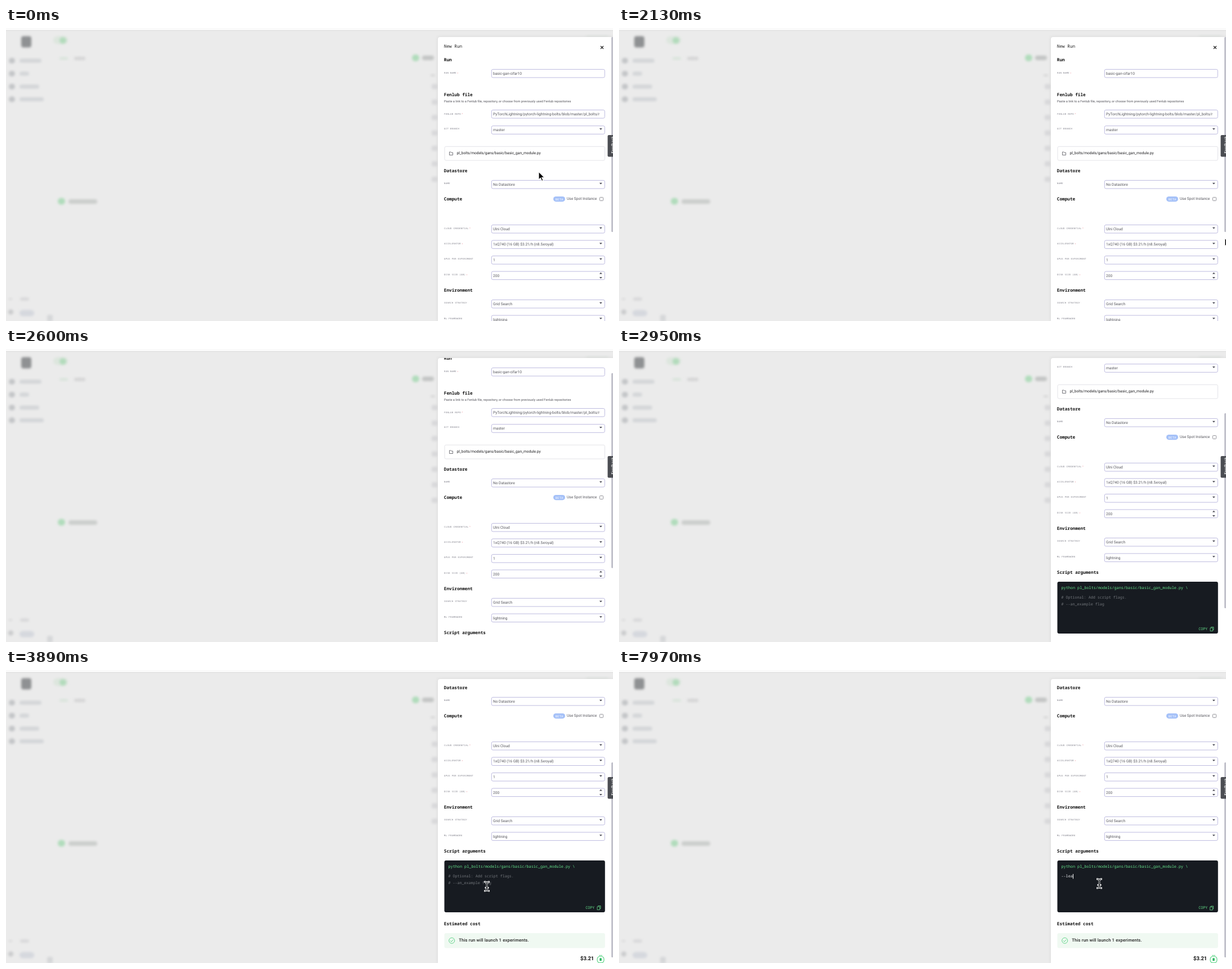
Write an HTML page that moves like this. It is 1078 px wide and 520 px high and loops after 8000 ms.

```html
<!DOCTYPE html>
<html lang="en">
<head>
<meta charset="utf-8">
<title>New Run</title>
<style>
html, body { margin: 0; width: 100%; height: 100%; overflow: hidden; background: #ebebeb; }
svg { display: block; }
text { font-family: Roboto, sans-serif; font-size: 6.62px; fill: #55555c; text-rendering: geometricPrecision; white-space: pre; }
.mono { font-family: "Noto Sans Mono", "DejaVu Sans Mono", monospace; }
.head { font-size: 7.72px; font-weight: 700; fill: #111; }
.title { font-size: 7.72px; fill: #222; }
.label { font-size: 3.9px; letter-spacing: .4px; fill: #70707c; }
.star { fill: #e5808a; }
.desc { font-size: 5.66px; }
.code { font-size: 6.82px; fill: #66e38c; }
.hint { font-size: 6.7px; fill: #73777c; }
.typed { font-size: 6.75px; fill: #eceef0; }
</style>
</head>
<body>
<svg id="stage" width="1078" height="520" viewBox="0 0 1078 520">
  <defs>
    <filter id="soft" x="-50%" y="-50%" width="200%" height="200%"><feGaussianBlur stdDeviation="2.3"/></filter>
    <filter id="shade" x="-10%" y="-10%" width="120%" height="120%"><feGaussianBlur stdDeviation="2"/></filter>
    <clipPath id="clip"><path d="M767 520V20q0-4 4-4H1078V520z"/></clipPath>
  </defs>
  <rect width="1078" height="520" fill="#ebebeb"/>
  <rect width="1078" height="4" fill="#fafafa"/>
  <rect y="4" width="1078" height="1" fill="#d9dada"/>
  <g id="back"></g>
  <path d="M766 522V20q0-5 5-5H1080V522z" fill="#cfcfcf" opacity=".5" filter="url(#shade)"/>
  <g clip-path="url(#clip)">
    <rect x="767" y="16" width="311" height="504" fill="#fff"/>
    <g id="form"></g>
  </g>
  <rect id="thumb" x="1075" y="16" width="3.5" height="346" rx="1.5" fill="#c2c2cc"/>
  <g>
    <path d="M1078 190h-7.500q-2 0-2 2v34.500q0 2 2 2h7.500z" fill="#4b4d52"/>
    <text transform="translate(1079.800 222.500) rotate(-90)" style="font-size:7px;font-weight:500;fill:#fff">Feedback</text>
  </g>
  <path id="arrow" d="M0 0V14.200L3.300 11.200L5.600 16.500L8 15.500L5.700 10.300H10.200Z" fill="#000" stroke="#fff" stroke-width="1.100"/>
  <g id="beam" fill="none">
    <path id="beamEdge" stroke="#fff" stroke-width="2.800" stroke-linecap="square"/>
    <path id="beamCore" stroke="#15181c" stroke-width="1"/>
  </g>
</svg>
<script>
const $ = id => document.getElementById(id);

function add(parent, tag, attrs, words) {
  const el = document.createElementNS("http://www.w3.org/2000/svg", tag);
  for (const k in attrs) el.setAttribute(k, attrs[k]);
  if (words) el.textContent = words;
  parent.appendChild(el);
  return el;
}

// Blurred page behind the panel
const back = $("back");
const blur = (x, y, w, h, fill, r = h / 2) =>
  add(back, "rect", { x, y: y - h / 2, width: w, height: h, rx: r, fill, filter: "url(#soft)" });

blur(27, 24.5, 18, 20, "#8f9193", 4);
blur(84, 21.5, 26, 14, "#dde6de");
blur(95, 22, 12, 11, "#b2dbbc");
[[58, 39], [81, 17], [104, 35], [126.5, 43]].forEach(([y, w]) => {
  blur(5, y, 11, 10, "#c3c5c7");
  blur(24, y, w, 7, "#d3d5d8");
});
blur(95, 54, 15, 5, "#d9e4db");
blur(121, 54, 20, 6, "#d5d5d6");
blur(721, 53, 13, 12, "#b0dcbb");
blur(739, 53, 21, 8, "#c3c5c4");
blur(754, 84, 8, 4, "#d6d6d6");
for (let i = 0; i < 7; i++) blur(756, 104 + i * 27.4, 11, 9, "#d8d8da", 2);
blur(92, 307.5, 13, 12, "#b0dcbb");
blur(111, 308, 51, 8, "#cbcecc");
blur(5, 481, 6, 4, "#dadadb");
blur(25, 481, 16, 6, "#d9d9da");
blur(4, 504, 9, 9, "#c9cacc");
blur(24, 506, 26, 11, "#d5d8de");
blur(73, 515, 10, 12, "#d6d7d9", 3);
blur(1030, 15, 40, 4, "#dfe3e0");

// Panel form
const form = $("form");
const text = (x, y, words, cls = "", parent = form) => add(parent, "text", { x, y, class: cls }, words);
const box = (x, y, width, height, rx, fill, stroke = "none") =>
  add(form, "rect", { x, y, width, height, rx, fill, stroke });
const line = (d, stroke, w = 1, fill = "none", parent = form) =>
  add(parent, "path", { d, stroke, "stroke-width": w, fill, "stroke-linejoin": "round" });
const head = (y, words) => text(777.8, y + 2.7, words, "mono head");
const tri = (y, h) => add(form, "path", { d: `M1053.800 ${y}h5l-2.500 ${h}z`, fill: "#4a4a55" });

function field(cy, labelY, label, value, kind, must) {
  text(778, labelY + 1.5, label, "mono label");
  if (must) text(778 + label.length * 2.74 + 1, labelY + 2, "*", "mono label star");
  box(862.3, cy - 7.3, 201, 14.6, 2.5, "#fff", "#bdbbdf");
  text(865, cy + 2.2, value);
  if (kind === "select") tri(cy - 3, 2.8);
  if (kind === "number") { tri(cy - 2.7, -2.8); tri(cy + 2.7, 2.8); }
}

text(777.8, 35.2, "New Run", "mono title");
line("M1056 32l5 5m0-5l-5 5", "#222", 1.2);

head(56, "Run");
field(80.7, 79.5, "RUN NAME", "basic-gan-cifar10", "", true);

head(118, "Fenlub file");
text(778, 132, "Paste a link to a Fenlub file, repository, or choose from previously used Fenlub repositories", "desc");
field(152.8, 152, "FENLUB REPO", "PyTorchLightning/pytorch-lightning-bolts/blob/master/pl_bolts/r", "", true);
field(181, 178, "GIT BRANCH", "master", "select");
box(779, 210.3, 284.500, 24.700, 2.5, "#fff", "#e3e3e8");
line("M787.500 220h2.300l1 1.100h2.700v4.400h-6z", "#55555c", .8);
text(800.5, 224.2, "pl_bolts/models/gans/basic/basic_gan_module.py").style.fill = "#1c1c1f";

head(253, "Datastore");
field(277.7, 275, "NAME", "No Datastore", "select");

head(303, "Compute");
box(972, 299, 21, 9.2, 4.6, "#a5c1f8");
text(975.7, 305.5, "BETA").style.cssText = "font-size:5.2px;letter-spacing:.4px;fill:#fff";
text(996, 305.2, "Use Spot Instance");
box(1054.5, 300.5, 6, 6, .8, "#fff", "#96969c");
field(356.7, 355, "CLOUD CREDENTIAL", "Ulni Cloud", "select", true);
field(384.2, 382.5, "ACCELERATOR", "1xQ740 (16 GB) $3.21/h (n8.5xroyal)", "select", true);
field(411.8, 409.5, "GPUS PER EXPERIMENT", "1", "select");
field(439.3, 437.5, "DISK SIZE (GB)", "200", "number", true);

head(465, "Environment");
field(489.7, 487.5, "SEARCH STRATEGY", "Grid Search", "select");
field(517.3, 515, "ML FRAMEWORK", "lightning", "select");

head(543, "Script arguments");
box(778.5, 560, 285.3, 92, 3, "#171b21");
text(785.5, 573, "python pl_bolts/models/gans/basic/basic_gan_module.py \\", "mono code");
const hint = add(form, "g", {});
text(785.5, 590, "# Optional: Add script flags.", "mono hint", hint);
text(785.5, 601.5, "# --an_example flag", "mono hint", hint);
const typed = text(785.5, 590, "", "mono typed");
const caret = add(form, "rect", { y: 584, width: 1, height: 8.5, fill: "#fff" });
text(1029.3, 646.1, "COPY", "mono code").style.cssText = "font-size:6.6px;font-weight:500";
const copy = add(form, "g", {});
line("M1051.500 641.500v-1h4.500v5h-1M1050 642h4.500v5.500h-4.500z", "#66d38a", .8, "none", copy);

head(672, "Estimated cost");
box(778.5, 689, 285.3, 26.5, 3, "#f0f9f2");
add(form, "circle", { cx: 791.7, cy: 702.2, r: 5, fill: "none", stroke: "#5fd488" });
line("M789.200 702.300l1.800 1.900l3.400-3.700", "#5fd488");
text(804.3, 704.4, "This run will launch 1 experiments.").style.cssText =
  "font-size:7.7px;font-weight:500;letter-spacing:.14px;fill:#222";
text(1020, 737.4, "$3.21").style.cssText = "font-size:9.4px;font-weight:700;fill:#111";
line("M1053 728.500h6M1053 730.500h6q3 1.500 3 5.500t-3 5.500h-6q-3-1.500-3-5.500t3-5.500z", "#5fd488", 1.2);
box(1054.2, 733.3, 3.6, 5, 1, "#2fb765");

// Text pointer shape, centred on its hot spot
const beamPath = "M-3.500-8q3.500 0 3.500 3V5q0 3-3.500 3M3.500-8q-3.500 0-3.500 3V5q0 3 3.500 3M-2 2.500h4";
$("beamEdge").setAttribute("d", beamPath);
$("beamCore").setAttribute("d", beamPath);

// Timelines: each entry holds until the next one
const pointer = [
  [0, "arrow", 946, 255], [110, "arrow", 944, 306], [230, "arrow", 941, 350],
  [460, "arrow", 945, 362], [580, "arrow", 962, 390], [700, "arrow", 990, 411],
  [820, "arrow", 1020, 418], [930, "arrow", 1047, 408], [1050, "arrow", 1064, 386],
  [1170, "arrow", 1072, 364], [1290, "arrow", 1073, 358], [1410, "arrow", 1074, 355],
  [1530, "arrow", 1075, 359], [2010, "arrow", 1076, 366], [2130, "arrow", 1076, 373],
  [2250, ""], [3650, "arrow", 981, 475], [3770, "beam", 888, 412],
  [3890, "beam", 854, 384], [4010, "beam", 853, 381], [4130, "beam", 853, 379]
];
const scroll = [
  [0, 0], [2250, 3], [2370, 10], [2480, 22], [2600, 40], [2720, 72], [2840, 110],
  [2950, 147], [3070, 177], [3190, 198], [3310, 212], [3430, 219], [3540, 222]
];
const typing = [
  [0, 0, 0], [4370, 0, 1], [4850, 0, 0], [5330, 0, 1], [5570, 1, 1], [6170, 2, 1],
  [6650, 2, 0], [7250, 2, 1], [7490, 3, 1], [7850, 4, 1], [7970, 5, 1]
];
const caretX = [786, 790, 794, 797, 802, 806];
const at = (list, t) => list.findLast(e => e[0] <= t);
const show = (el, on) => el.setAttribute("visibility", on ? "visible" : "hidden");

function draw(t) {
  const [, y] = at(scroll, t);
  form.setAttribute("transform", `translate(0 ${-y})`);
  $("thumb").setAttribute("y", 16 + y * 2 / 3);

  const [, kind, px, py] = at(pointer, t);
  for (const id of ["arrow", "beam"]) {
    show($(id), id === kind);
    if (id === kind) $(id).setAttribute("transform", `translate(${px} ${py})`);
  }

  const [, count, lit] = at(typing, t);
  typed.textContent = "--lea".slice(0, count);
  show(hint, !count);
  show(caret, lit);
  caret.setAttribute("x", caretX[count]);
  copy.setAttribute("transform", count ? "translate(-.4 .5)" : "");
}

function tick() {
  draw(performance.now() % 8000);
  requestAnimationFrame(tick);
}
tick();
</script>
</body>
</html>
```
